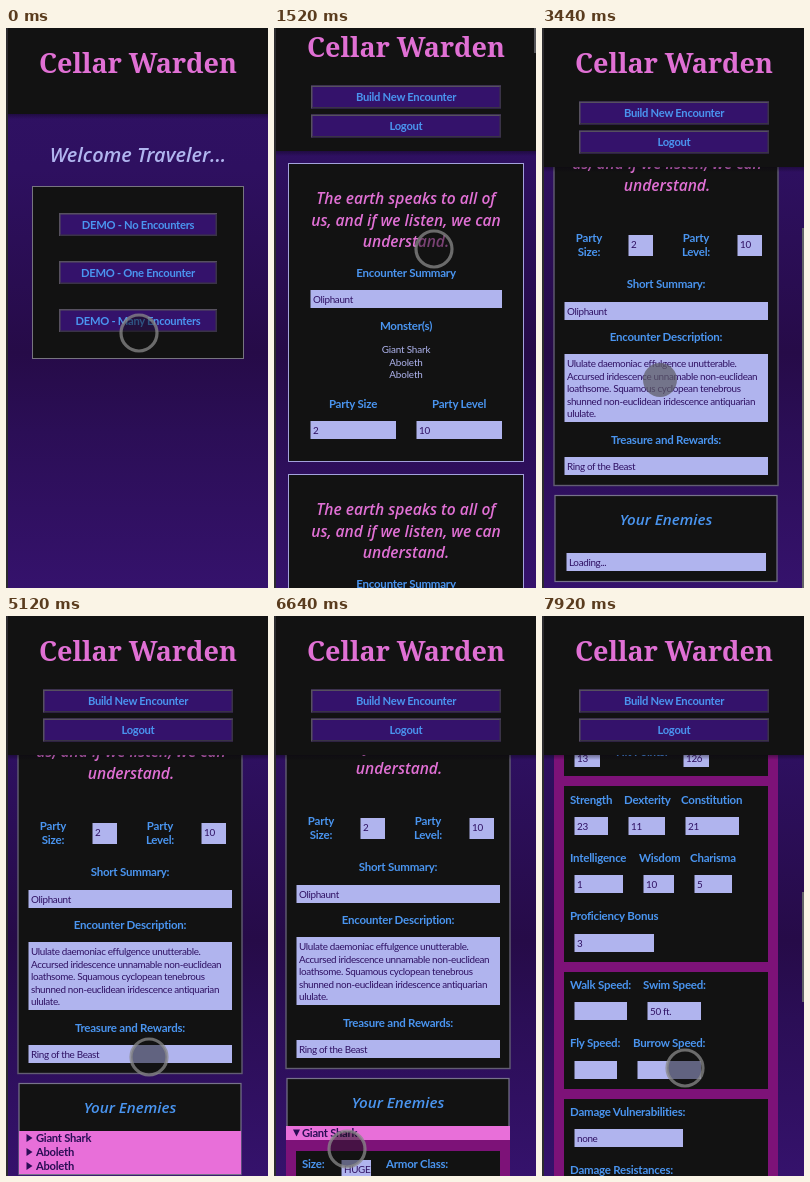
An HTML page for the animation above (8 s loop, 262 px wide and 560 px high).

```html
<!DOCTYPE html>
<html lang="en">
<head>
<meta charset="utf-8">
<title>Cellar Warden</title>
<style>
html, body { margin: 0; width: 100%; height: 100%; overflow: hidden; background: #121212; }
svg { display: block; width: 262px; height: 560px; }
text { font-family: Lato, "Open Sans", sans-serif; white-space: pre; }
.mid { text-anchor: middle; }
.title { font: 700 27px "Noto Serif", serif; fill: #e070d4; }
.welcome, .quote, .foes { font: italic 600 15.6px "Open Sans", "Noto Sans", sans-serif; fill: #e070d4; }
.welcome { font-size: 20px; fill: #b0b5ef; }
.foes { font-size: 15.2px; fill: #4a95f0; }
.label { font-size: 11.5px; font-weight: 700; letter-spacing: -.22px; fill: #4a95f0; }
.btn { font-size: 11.2px; font-weight: 700; letter-spacing: -.27px; fill: #4a95f0; }
.row { font-size: 11.2px; font-weight: 700; letter-spacing: -.25px; fill: #2a0d55; }
.val { font-size: 9.9px; letter-spacing: -.34px; fill: #2f1163; }
.beast { font-size: 9.9px; letter-spacing: -.15px; fill: #b0b5ef; }
.field { fill: #b0b4ee; }

#home, #list, #fight, #loading, #closed, #open, #ring, #press { animation: 8s step-end infinite; }
#home { animation-name: home; }
#list { animation-name: list; }
#fight { animation-name: fight; }
#loading { animation-name: loading; }
#closed { animation-name: closed; }
#open { animation-name: open; }
#press { animation-name: press; }
#ring { animation-name: ring; }
@keyframes home { 0% { opacity: 1 } 6%, to { opacity: 0 } }
@keyframes list { 0% { opacity: 0 } 6% { opacity: 1 } 24%, to { opacity: 0 } }
@keyframes fight { 0% { opacity: 0 } 24%, to { opacity: 1 } }
@keyframes loading { 0% { opacity: 1 } 49%, to { opacity: 0 } }
@keyframes closed { 0% { opacity: 0 } 49% { opacity: 1 } 72%, to { opacity: 0 } }
@keyframes open { 0% { opacity: 0 } 72%, to { opacity: 1 } }
@keyframes press {
  0% { opacity: 0 } 3% { opacity: 1 } 5% { opacity: 0 } 21% { opacity: 1 } 23% { opacity: 0 }
  34% { opacity: 1 } 44% { opacity: 0 } 70% { opacity: 1 } 72% { opacity: 0 }
  89% { opacity: 1 } 94%, to { opacity: 0 }
}
@keyframes ring {
  0% { opacity: 1 } 3% { opacity: 0 } 5% { opacity: 1 } 21% { opacity: 0 } 23% { opacity: 1 }
  34% { opacity: 0 } 44% { opacity: 1 } 70% { opacity: 0 } 72% { opacity: 1 }
  89% { opacity: 0 } 94%, to { opacity: 1 }
}

#listPage { animation: listScroll 8s ease-out infinite; }
#page { animation: pageScroll 8s ease-out infinite; }
#thumb { animation: thumb 8s ease-out infinite; }
#thumb2 { animation: thumb2 8s ease-out infinite; }
#touch { animation: touch 8s ease-in-out infinite; }
@keyframes listScroll {
  0%, 12% { transform: translateY(0) }
  18%, to { transform: translateY(-16px) }
}
@keyframes pageScroll {
  0%, 35% { transform: translateY(0) }
  41%, 72.5% { transform: translateY(-70px) }
  76%, 89% { transform: translateY(-75px) }
  98%, to { transform: translateY(-518px) }
}
@keyframes thumb {
  0%, 35% { transform: translateY(0); opacity: 1 }
  41%, 46% { transform: translateY(61px); opacity: 1 }
  49%, to { transform: translateY(61px); opacity: 0 }
}
@keyframes thumb2 {
  0%, 88.9% { transform: translateY(0); opacity: 0 }
  89% { transform: translateY(0); opacity: 1 }
  98%, to { transform: translateY(117px); opacity: 1 }
}
@keyframes touch {
  0%, 7% { transform: translate(133px, 305px) }
  17%, 30.5% { transform: translate(160px, 221px) }
  34%, 35% { transform: translate(118px, 422px) }
  41%, 46% { transform: translate(118px, 352px) }
  55%, 64.5% { transform: translate(143px, 441px) }
  69%, 73% { transform: translate(62px, 522px) }
  76%, 84% { transform: translate(73px, 533px) }
  88%, 89% { transform: translate(143px, 535px) }
  94% { transform: translate(143px, 300px) }
  98%, to { transform: translate(143px, 452px) }
}
</style>
</head>
<body>
<svg id="stage" viewBox="0 0 262 560"></svg>
<script>
const text = (x, y, s, cls) => `<text x="${x}" y="${y}" class="${cls}">${s}</text>`;
const mid = (x, y, s, cls) => text(x, y, s, cls + ' mid');
const box = (x, y, w, h, fill, extra = '') =>
  `<rect x="${x}" y="${y}" width="${w}" height="${h}" fill="${fill}" ${extra}/>`;
const group = (id, ...parts) => `<g id="${id}">${parts.join('')}</g>`;
const label = (x, y, s) => text(x, y, s, 'label');
const field = (x, y, w, s = '', h = 18) =>
  `<rect x="${x + .5}" y="${y}" width="${w - .5}" height="${h}" class="field"/>` + text(x + 3, y + 13, s, 'val');
const lines = (x, y, step, rows, cls) => rows.map((s, i) => text(x, y + i * step, s, cls)).join('');

function button(x, y, w, s) {
  const h = 23, r = x + w, b = y + h;
  return box(x, y, w, h, '#34126b') +
    `<path d="M${x + .75} ${b}V${y + .75}H${r}" fill="none" stroke="#56505f" stroke-width="1.5"/>` +
    `<path d="M${x + 1} ${b - .75}H${r - .75}V${y + 1}" fill="none" stroke="#3a3347" stroke-width="1.5"/>` +
    mid(x + w / 2, y + 15.5, s, 'btn');
}

function header(h, buttons) {
  return box(2, h, 260, 5, 'url(#shade)') + box(2, 0, 260, h, '#121212') +
    mid(132, 45, 'Cellar Warden', 'title') +
    (buttons ? button(37, 73.5, 190, 'Build New Encounter') + button(37, 102.5, 190, 'Logout') : '');
}

const backdrop = box(2, 0, 260, 560, 'url(#night)');
const quote = ['The earth speaks to all of', 'us, and if we listen, we can', 'understand.'];

const home = group('home', backdrop, header(86),
  mid(132, 134, 'Welcome Traveler...', 'welcome'),
  box(26.5, 158.5, 211, 172, '#121212', 'stroke="#77757f"'),
  ['No Encounters', 'One Encounter', 'Many Encounters']
    .map((s, i) => button(53, 185 + i * 48, 158, 'DEMO - ' + s)).join(''));

const card = y => `<g transform="translate(0 ${y})">` +
  box(14.5, .5, 235, 298, '#121212', 'stroke="#a3a2dc"') +
  lines(132, 41, 21.7, quote, 'quote mid') +
  mid(132, 114, 'Encounter Summary', 'label') + field(36, 127, 192, 'Oliphaunt') +
  mid(132, 167, 'Monster(s)', 'label') +
  lines(132, 190, 12.6, ['Giant Shark', 'Aboleth', 'Aboleth'], 'beast mid') +
  mid(79, 245, 'Party Size', 'label') + mid(185, 245, 'Party Level', 'label') +
  field(36, 258, 86, '2') + field(142, 258, 86, '10') + '</g>';

const list = group('list', backdrop,
  group('listPage', card(151), card(462), header(139, true)),
  box(260, 0, 2, 25, '#56565a'));

const summary =
  box(12, 149.5, 224, 378, '#121212', 'stroke="#625d72" stroke-width="1.4"') +
  lines(125, 189.5, 21.7, quote, 'quote mid') +
  lines(47, 284, 14, ['Party', 'Size:'], 'label mid') + field(86, 277, 25, '2', 21) +
  lines(154, 284, 14, ['Party', 'Level:'], 'label mid') + field(195, 277, 25, '10', 21) +
  mid(124, 330, 'Short Summary:', 'label') + field(22, 344, 204, 'Oliphaunt') +
  mid(124, 383, 'Encounter Description:', 'label') + field(22, 396, 204, '', 68) +
  lines(25, 409, 12.6, [
    'Ululate daemoniac effulgence unutterable.',
    'Accursed iridescence unnamable non-euclidean',
    'loathsome. Squamous cyclopean tenebrous',
    'shunned non-euclidean iridescence antiquarian',
    'ululate.'], 'val') +
  mid(124, 486, 'Treasure and Rewards:', 'label') + field(22, 499, 204, 'Ring of the Beast');

const foes = h => box(13, 537.5, 222, h, '#121212', 'stroke="#77738a" stroke-width="1.2"') +
  mid(124, 567, 'Your Enemies', 'foes');
const panel = (y, h) => box(22, y, 204, h, '#121212');

const loading = group('loading', foes(86), field(24, 595, 200, 'Loading...'));

const closed = group('closed', foes(91), box(13, 585, 222, 43, '#e86fd9'),
  ['Giant Shark', 'Aboleth', 'Aboleth'].map((s, i) => {
    const y = 596 + i * 14;
    return `<path d="M20.5 ${y - 8}l6 4-6 4z" fill="#2a0d55"/>` + text(30, y, s, 'row');
  }).join(''));

const open = group('open', foes(640),
  box(12, 599, 224, 600, '#7d1278'), box(12, 585, 224, 14, '#e86fd9'),
  '<path d="M19 588.5h7l-3.5 7z" fill="#2a0d55"/>', text(28, 596, 'Giant Shark', 'row'),
  panel(610, 68),
  label(28, 627, 'Size:'), field(67, 619, 30, 'HUGE', 16), label(112, 627, 'Armor Class:'),
  field(32, 651, 26, '13'), label(74, 658, 'Hit Points:'), field(141, 651, 26, '126'),
  '<g transform="translate(0 518)">',
  panel(170, 176),
  label(28, 188, 'Strength'), label(82, 188, 'Dexterity'), label(139, 188, 'Constitution'),
  field(32, 201, 34, '23'), field(86, 201, 37, '11'), field(143, 201, 54, '21'),
  label(28, 246, 'Intelligence'), label(97, 246, 'Wisdom'), label(148, 246, 'Charisma'),
  field(32, 259, 49, '1'), field(101, 259, 31, '10'), field(152, 259, 38, '5'),
  label(28, 304, 'Proficiency Bonus'), field(32, 318, 80, '3'),
  panel(356, 117),
  label(28, 373, 'Walk Speed:'), label(101, 373, 'Swim Speed:'),
  field(32, 386, 53), field(105, 386, 54, '50 ft.'),
  label(28, 431, 'Fly Speed:'), label(91, 431, 'Burrow Speed:'),
  field(32, 445, 43), field(95, 445, 64),
  panel(483, 130),
  label(28, 500, 'Damage Vulnerabilities:'), field(32, 513, 109, 'none'),
  label(28, 558, 'Damage Resistances:'), '</g>');

const fight = group('fight', backdrop,
  group('page', summary, loading, closed, open),
  header(139, true),
  '<rect id="thumb" x="260" y="139" width="2" height="363" fill="#626267"/>',
  '<rect id="thumb2" x="260" y="159" width="2" height="110" fill="#626267"/>');

const touch = group('touch',
  '<circle id="ring" r="18" fill="#121212" fill-opacity=".5" stroke="#8a8a8a" stroke-opacity=".75" stroke-width="3.2"/>',
  '<circle id="press" r="17" fill="#5c5c64" fill-opacity=".72"/>');

const stop = ([at, c, o = 1]) => `<stop offset="${at}" stop-color="${c}" stop-opacity="${o}"/>`;
const night = [[.12, '#2f1163'], [.25, '#2e1060'], [.58, '#260b48'], [.72, '#2b0e56'], [1, '#35126c']];
const shade = [[0, '#0b0414', .4], [1, '#0b0414', 0]];
const defs = '<defs>' + [['night', night], ['shade', shade]].map(([id, stops]) =>
  `<linearGradient id="${id}" x2="0" y2="1">${stops.map(stop).join('')}</linearGradient>`).join('') + '</defs>';

document.getElementById('stage').innerHTML =
  defs + home + list + fight + box(0, 0, 2, 560, '#2c2b2e') + touch;
</script>
</body>
</html>
```
